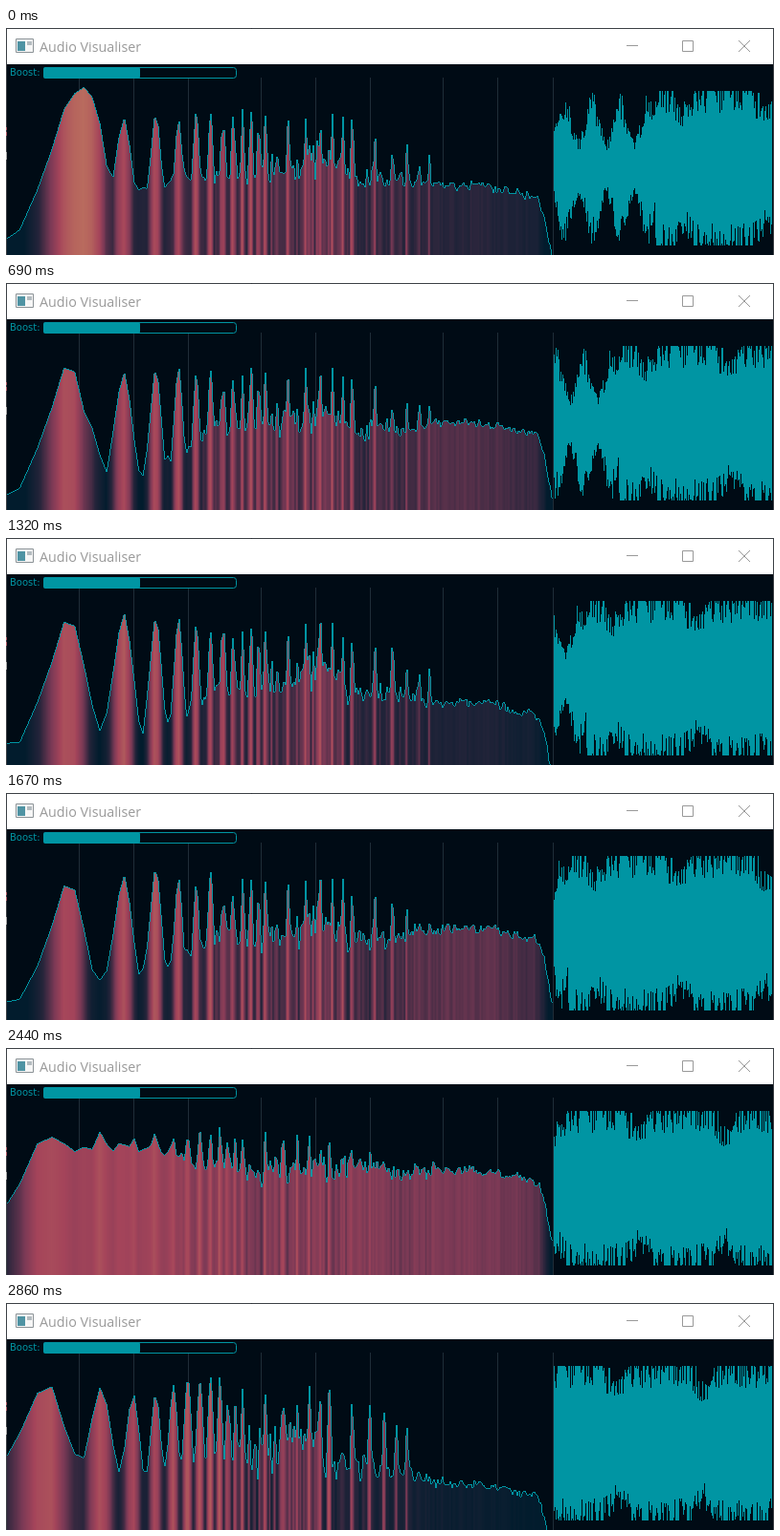
Animation, 802 px wide and 238 px high, one loop 2.93 s. Source, as an HTML page with a canvas:

```html
<!DOCTYPE html>
<html lang="en">
<head>
<meta charset="utf-8">
<title>Audio Visualiser</title>
<style>
  html, body { margin: 0; width: 100%; height: 100%; overflow: hidden; background: #000b15; }
  canvas, svg { position: absolute; left: 0; top: 0; display: block; }
</style>
</head>
<body>
<canvas id="stage" width="802" height="238"></canvas>
<svg width="802" height="238" fill="none">
  <path d="M1 1H801V38H1Z" fill="#fff"/>
  <path d="M0 .5H802M.5 0V238M801.5 0V238" stroke="#3c4045"/>
  <path d="M.5 104v3M.5 109v4" stroke="#b5606c"/>
  <path d="M.5 130v8" stroke="#aaa"/>
  <!-- window icon -->
  <path d="M10.5 11.5H28.5V25.5H10.5Z" fill="#f6f6f6" stroke="#8b9296"/>
  <path d="M12 14H20V24H12Z" fill="#4f93a3"/>
  <path d="M22 14H27V18H22Z" fill="#b4bcc0"/>
  <text x="35" y="25" font-size="14.3" font-family="'Open Sans', 'Noto Sans', sans-serif" fill="#999">Audio Visualiser</text>
  <path d="M648 18.5H660M706.5 13.5H717.5V24.5H706.5ZM765 13L777 25M777 13L765 25" stroke="#999"/>
  <!-- boost slider -->
  <text x="4" y="50" font-size="10" font-family="'DejaVu Sans', sans-serif" fill="#0095a3">Boost:</text>
  <rect x="39.5" y="41.5" width="201" height="11" rx="3" stroke="#0095a3"/>
  <rect x="39" y="41" width="101" height="12" rx="2" fill="#0095a3"/>
</svg>
<script>
const ctx = document.getElementById('stage').getContext('2d');
const TEAL = '#0095a3', BACK = '#000b15', LOOP = 2930, BOTTOM = 238;
const BIN_HZ = 48000 / 8192;

const clamp = (v, low, high) => Math.max(low, Math.min(high, v));
const lerp = (a, b, t) => a + (b - a) * t;
const ramp = (v, from, to) => clamp((v - from) / (to - from), 0, 1);
const hzToX = hz => 190 * Math.log10(hz / 20);

function random(a, b) {
  const v = Math.sin(a * 127.1 + b * 311.7) * 43758.5453;
  return v - Math.floor(v);
}

// noise floor over time: height of the bass, middle and treble
const FLOOR = [
  { frame: 0, low: 165, mid: 157, high: 165 },
  { frame: 10, low: 200, mid: 153, high: 147 },
  { frame: 19, low: 205, mid: 161, high: 173 },
  { frame: 24, low: 190, mid: 155, high: 141 },
  { frame: 30, low: 185, mid: 156, high: 156 },
  { frame: 35, low: 105, mid: 128, high: 128 },
  { frame: 41, low: 178, mid: 174, high: 190 },
];
const KICKS = [{ frame: 0, hz: 52, top: 62 }, { frame: 30, hz: 47, top: 70 }];

function floorAt(frame) {
  const i = FLOOR.findIndex((key, j) => j === FLOOR.length - 2 || FLOOR[j + 1].frame > frame);
  const a = FLOOR[i], b = FLOOR[i + 1], t = ramp(frame, a.frame, b.frame);
  const low = lerp(a.low, b.low, t), mid = lerp(a.mid, b.mid, t), high = lerp(a.high, b.high, t);
  return x => {
    const level = x < 300 ? lerp(low, mid, ramp(x, 150, 215)) : lerp(mid, high, ramp(x, 380, 465));
    const bassCut = Math.max(0, 40 - x) * 1.6;
    const trebleCut = 12 * ramp(x, 500, 550) + 0.18 * Math.max(0, x - 550) ** 2;
    return x < 300 ? Math.min(222, level + bassCut) : level + trebleCut;
  };
}

// overtones of the bass note: every one at first, then only the consonant ones stand out
function overtones(frame) {
  const note = frame < 27 ? 43.65 : 32.7, list = [];
  for (let n = 1; n <= 96; n++) {
    if (n > 32 && n % 12) continue;
    const weak = n > 12 && n % 4 ? 40 : 0;
    const fade = 0.4 * Math.max(0, hzToX(n * note) - 330);
    list.push({ bin: n * note / BIN_HZ, top: 76 + weak + fade + 22 * random(n, frame >> 2) });
  }
  return list;
}

function spectrum(frame) {
  const floor = floorAt(frame), tones = overtones(frame), points = [];
  const kick = KICKS.findLast(k => k.frame <= frame), age = frame - kick.frame;
  for (let bin = 3; bin < 3400; bin = Math.max(bin + 1, Math.ceil(bin * 1.02))) {
    const x = hzToX(bin * BIN_HZ) + 0.5;
    const spread = lerp(lerp(10, 20, ramp(x, 150, 260)), 7, ramp(x, 370, 470));
    let y = floor(x) + spread * (random(bin, frame + 1) + random(bin, frame + 50) - 1);
    const width = Math.max(1, bin / 70);
    for (const tone of tones)
      y = Math.min(y, tone.top + 42 * Math.max(0, Math.abs(bin - tone.bin) / width - 0.4));
    y = Math.min(y, kick.top + 8 * age + 8.5 * (bin - kick.hz / BIN_HZ) ** 2);
    points.push({ x, y });
  }
  return points;
}

// colour of a spectrum column by the height of its top
const HEAT = [[60, 186, 109, 94], [100, 164, 68, 90], [130, 122, 57, 85], [165, 37, 36, 58], [200, 2, 28, 45]];

function heat(y) {
  let i = 0;
  while (i < HEAT.length - 2 && HEAT[i + 1][0] < y) i++;
  const t = ramp(y, HEAT[i][0], HEAT[i + 1][0]);
  return `rgb(${[1, 2, 3].map(c => Math.round(lerp(HEAT[i][c], HEAT[i + 1][c], t)))})`;
}

function drawGrid() {
  ctx.fillStyle = '#1f2d38';
  for (const decade of [10, 100, 1000, 10000])
    for (const step of [1, 2, 5]) {
      const x = Math.round(hzToX(decade * step));
      if (x > 0 && x < 570) ctx.fillRect(x, 52, 1, BOTTOM - 52);
    }
  ctx.fillRect(571, 52, 1, BOTTOM - 52);
}

function drawSpectrum(frame) {
  const points = spectrum(frame);
  let i = 0, previous;
  for (let x = 1; x < 571; x++) {
    while (i < points.length - 2 && points[i + 1].x < x) i++;
    const a = points[i], b = points[i + 1];
    const y = Math.round(Math.min(BOTTOM, lerp(a.y, b.y, ramp(x, a.x, b.x))));
    previous ??= y;
    ctx.fillStyle = heat(y);
    ctx.fillRect(x, y, 1, BOTTOM - y);
    ctx.fillStyle = TEAL;
    ctx.fillRect(x, Math.min(y, previous), 1, Math.max(1, Math.abs(y - previous)));
    previous = y;
  }
}

// a quiet pulsing intro, then a loud passage with regular dips
function loudness(s) {
  if (s < 678) return 47 + 20 * Math.cos((s - 583) / 29 * 2 * Math.PI);
  return 82 - 22 * Math.cos((s - 706) / 89 * Math.PI) ** 12;
}

function drawWave(frame) {
  const scroll = Math.round(frame * 3.8);
  ctx.fillStyle = TEAL;
  for (let x = 572; x < 800; x++) {
    const s = x + scroll;
    const reach = side => Math.round(Math.min(81, loudness(s) * (0.7 + 0.5 * random(s, side))));
    const up = reach(3), down = reach(7);
    ctx.fillRect(x, 147 - up, 1, up + down);
  }
}

function draw() {
  const time = performance.now() % LOOP;
  const frame = Math.min(41, Math.floor((time + (time > 380 ? 10 : 0)) / 70));
  ctx.fillStyle = BACK;
  ctx.fillRect(0, 0, 802, BOTTOM);
  drawGrid();
  drawSpectrum(frame);
  drawWave(frame);
  requestAnimationFrame(draw);
}
requestAnimationFrame(draw);
</script>
</body>
</html>
```
